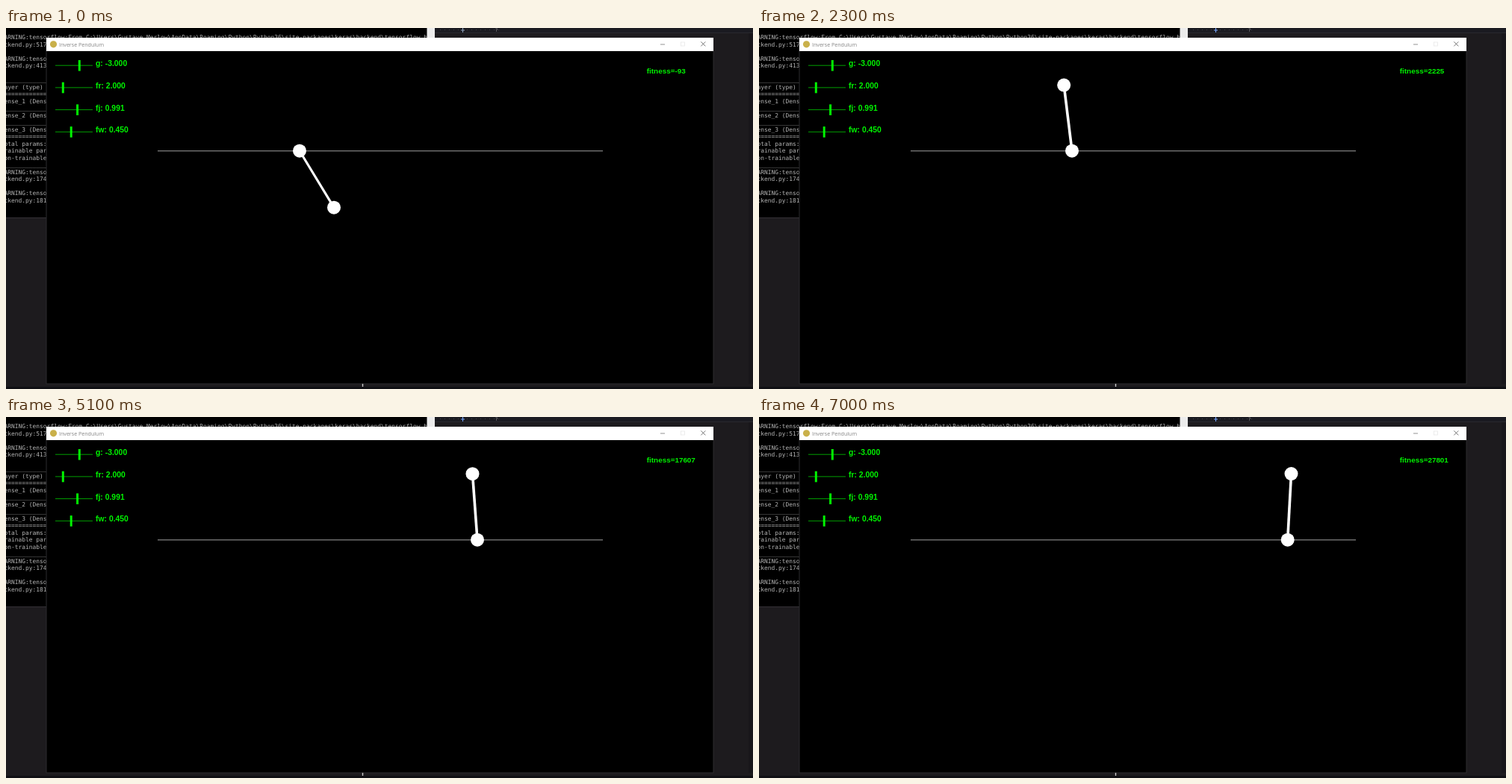
Recreate the animation shown at these times as an HTML page with a canvas. Size 1000 by 484 pixels, loop 7.1 s.

```html
<!DOCTYPE html>
<html lang="en">
<head>
<meta charset="utf-8">
<title>Inverse Pendulum</title>
<style>
  html, body { margin: 0; width: 100%; height: 100%; overflow: hidden; background: #000; }
  canvas { display: block; width: 1000px; height: 484px; }
</style>
</head>
<body>
<canvas id="stage"></canvas>
<script>
const LOOP = 7100, STEP = 100;
const RAIL_Y = 164.7, ROD = 88.8, BALL = 9;
const GREEN = '#00f400';

const canvas = document.getElementById('stage');
const ctx = canvas.getContext('2d');
const dpr = window.devicePixelRatio || 1;
canvas.width = 1000 * dpr;
canvas.height = 484 * dpr;
ctx.scale(dpr, dpr);

// [ms, value]; angles are degrees from hanging straight down, turning right
const cart = [[0, 393], [650, 396], [1400, 387], [2300, 419], [4000, 519],
              [5100, 631], [5800, 675.5], [7000, 707.7]];
const angle = [[0, 31.2], [150, 0], [650, -72], [1230, 0], [1400, 47.3], [1600, 99],
               [1850, 148], [2300, 187], [4000, 177.6], [5100, 184.2],
               [5800, 181.2], [7000, 176.9]];
const score = [[0, -93], [1400, -388], [1750, -400], [2300, 2225], [4000, 11739],
               [5100, 17607], [5800, 21275], [7000, 27801]];

function segment(keys, t) {
  let i = 0;
  while (i < keys.length - 2 && t >= keys[i + 1][0]) i++;
  return i;
}

function linear(keys, t) {
  const i = segment(keys, t);
  const [t0, a] = keys[i], [t1, b] = keys[i + 1];
  return a + (b - a) * (t - t0) / (t1 - t0);
}

// Slope at a key, flat at turning points
function slope(keys, i) {
  const rate = j => (keys[j + 1][1] - keys[j][1]) / (keys[j + 1][0] - keys[j][0]);
  if (i === 0) return rate(0);
  if (i === keys.length - 1) return rate(i - 1);
  const p = rate(i - 1), q = rate(i);
  return p * q <= 0 ? 0 : 2 * p * q / (p + q);
}

function smooth(keys, t) {
  const i = segment(keys, t);
  const [t0, a] = keys[i], [t1, b] = keys[i + 1];
  const h = t1 - t0, u = (t - t0) / h, v = 1 - u;
  return v * v * (1 + 2 * u) * a + u * u * (3 - 2 * u) * b
       + h * u * v * (v * slope(keys, i) - u * slope(keys, i + 1));
}

function rect(x, y, w, h, color) {
  ctx.fillStyle = color;
  ctx.fillRect(x, y, w, h);
}

function text(str, x, y, font, color) {
  ctx.font = font;
  ctx.fillStyle = color;
  ctx.fillText(str, x, y);
}

function line(x0, y0, x1, y1, width, color) {
  ctx.strokeStyle = color;
  ctx.lineWidth = width;
  ctx.beginPath();
  ctx.moveTo(x0, y0);
  ctx.lineTo(x1, y1);
  ctx.stroke();
}

function disc(x, y, r, color) {
  ctx.fillStyle = color;
  ctx.beginPath();
  ctx.arc(x, y, r, 0, Math.PI * 2);
  ctx.fill();
}

const rule = '_'.repeat(65), bar = '='.repeat(65);
const warning = 'ARNING:tensorflow:From C:\\Users\\Gustave Merlow\\AppData\\Roaming\\Python' +
  '\\Python36\\site-packages\\keras\\backend\\tensorflow_b';
const log = [
  warning, 'ckend.py:517:', '', warning, 'ckend.py:4138:', '', rule,
  'ayer (type)', bar, 'ense_1 (Dense)', rule, 'ense_2 (Dense)', rule,
  'ense_3 (Dense)', bar, 'otal params:', 'rainable params:', 'on-trainable params:',
  rule, warning, 'ckend.py:174:', '', warning, 'ckend.py:181:'
];

function drawDesktop(t) {
  rect(0, 0, 1000, 484, '#1d1b1e');
  rect(574, 0, 426, 6, '#1b1b21');
  rect(574, 6, 426, 1, '#29292e');
  rect(994, 7, 6, 470, '#18161a');
  rect(0, 481, 1000, 3, '#101014');
  for (let x = 581; x < 660; x += 6) rect(x, 2, 1, 1, '#3c3c46');
  const mark = t < STEP ? '#8fa3bd' : '#79a8ff';
  line(611.5, 0, 611.5, 6, 1, mark);
  line(609, 3, 614, 3, 1, mark);
  text('?', 655, 5, '6px "DejaVu Sans", sans-serif', '#a0a0a6');

  rect(0, 0, 564, 254, '#000');
  rect(0, 254, 54, 1, '#333136');
  rect(563.5, 0, 10.5, 13, '#ececec');
  ctx.save();
  ctx.beginPath();
  ctx.rect(0, 0, 563.5, 254);
  ctx.clip();
  log.forEach((row, i) =>
    text(row, -2.5, 15.1 + 9.51 * i, '7.92px "DejaVu Sans Mono", monospace', '#b4b4b4'));
  ctx.restore();
}

function drawWindow() {
  rect(53.5, 13, 894, 464.5, '#2c2c2e');
  rect(54, 13, 893, 18, '#fff');
  rect(54.5, 31, 892, 445.5, '#000');
  disc(63.5, 21.8, 4.6, '#c9b04a');
  text('Inverse Pendulum', 71, 24.5, '7.1px "Open Sans", sans-serif', '#858585');
  line(876, 22, 882, 22, 0.8, '#777');
  ctx.strokeStyle = '#e4e4e4';
  ctx.lineWidth = 0.7;
  ctx.strokeRect(903.5, 19, 5, 5);
  line(930.3, 18.4, 936.3, 24.4, 0.9, '#666');
  line(936.3, 18.4, 930.3, 24.4, 0.9, '#666');
  line(477.5, 477, 477.5, 481, 1.4, '#c8c8c8');
}

const sliders = [['g: -3.000', 98.3], ['fr: 2.000', 76.3], ['fj: 0.991', 95.6], ['fw: 0.450', 87.2]];

function drawSliders() {
  sliders.forEach(([label, x], i) => {
    const y = 50.2 + 29.7 * i;
    line(66, y, 116, y, 1, '#00a000');
    rect(x - 1.5, y - 7.2, 3, 14.6, GREEN);
    text(label, 120, y + 1.1, 'bold 10.4px "Liberation Sans", Arial, sans-serif', GREEN);
  });
}

function drawPendulum(t) {
  const x = smooth(cart, t), a = smooth(angle, t) * Math.PI / 180;
  const sin = Math.sin(a), cos = Math.cos(a);
  const bx = x + ROD * sin, by = RAIL_Y + ROD * cos;
  // The rod's thickness is constant along the minor axis, so it thins on diagonals
  const thick = 3.6 * Math.max(Math.abs(sin), Math.abs(cos));
  line(203, RAIL_Y, 799, RAIL_Y, 1.6, '#6c6c6c');
  line(x, RAIL_Y, bx, by, thick, '#fff');
  disc(x, RAIL_Y, BALL, '#fff');
  disc(bx, by, BALL, '#fff');
}

function draw(now) {
  const t = Math.floor(now % LOOP / STEP) * STEP;
  drawDesktop(t);
  drawWindow();
  drawSliders();
  drawPendulum(t);
  text('fitness=' + Math.round(linear(score, t)), 857.8, 60.6,
    'bold 9.9px "Liberation Sans", Arial, sans-serif', GREEN);
}

let start;
function tick(now) {
  start ??= now;
  draw(Math.max(0, now - start));
  requestAnimationFrame(tick);
}
draw(0);
requestAnimationFrame(tick);
</script>
</body>
</html>
```
